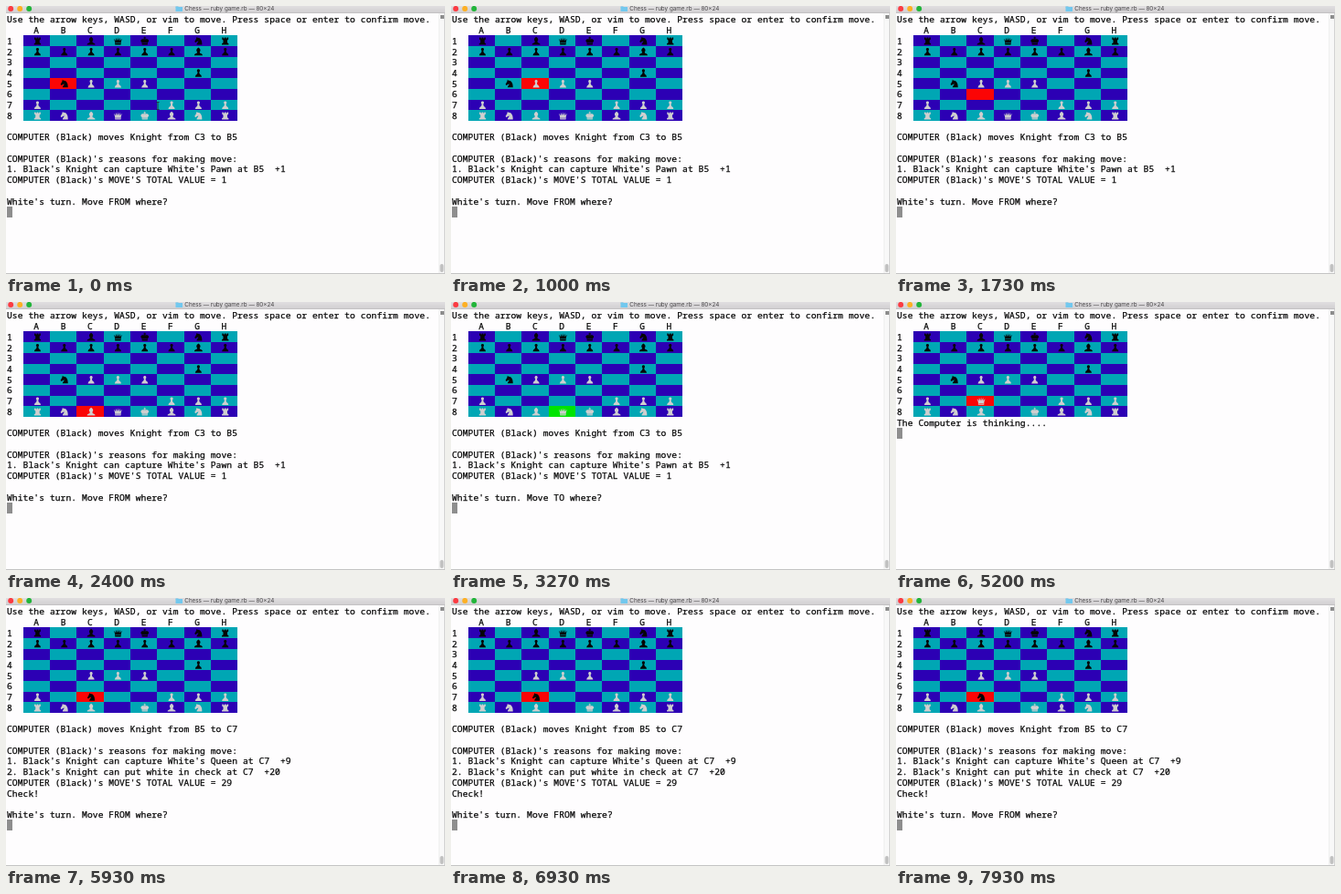
An HTML page with a canvas that plays this animation: 480 by 294 pixels, repeating every 8 s.

```html
<!DOCTYPE html>
<html lang="en">
<head>
<meta charset="utf-8">
<title>Chess in the terminal</title>
<style>
  html, body { margin: 0; width: 100%; height: 100%; overflow: hidden; background: #fefdfe; }
  canvas { display: block; width: 480px; height: 294px; }
</style>
</head>
<body>
<canvas id="stage"></canvas>
<script>
const W = 480, H = 294, LOOP = 8000;
const CELL = 5.865, LINE = 11.72, LEFT = 1, TOP = 9;
const BLUE = '#2c00b4', TEAL = '#00a6b4', RED = '#fb0505', GREEN = '#00e400';

const canvas = document.getElementById('stage');
const ctx = canvas.getContext('2d');
const dpr = window.devicePixelRatio || 1;
canvas.width = W * dpr;
canvas.height = H * dpr;

// Each piece is drawn in a 10 by 10 box; the band is cut out of the body.
const BAND = 'M2.3 7.4H7.7V7.9H2.3Z';
const SHAPES = {
  p: new Path2D('M5 .8A1.6 1.6 0 0 1 6 3.7L6 4.6C6 6 6.6 6.6 8 7.4L8.7 9.4H1.3L2 7.4C3.4 6.6 4 6 4 4.6L4 3.7A1.6 1.6 0 0 1 5 .8Z'),
  b: new Path2D('M5 .4C7.6 2 7.8 4 6.4 5.4L6.8 6.9C8 7.4 9.6 7.6 9.6 9.3H.4C.4 7.6 2 7.4 3.2 6.9L3.6 5.4C2.2 4 2.4 2 5 .4Z'),
  n: new Path2D('M3 .5L4 1.4C7.5 1.2 9.2 4.5 9.1 9.3H3C3 7.4 5 6.6 5 5L3 6 1.8 6.9 .7 5.8 2.5 2.6Z'),
  r: new Path2D('M1.5 1H3V2H4.2V1H5.8V2H7V1H8.5V3.4L7.3 4.2V7L8.8 8V9.4H1.2V8L2.7 7V4.2L1.5 3.4Z'),
  q: new Path2D('M.5 2.4L2.6 5 2.7 1.3 4.3 4.6 5 .8 5.7 4.6 7.3 1.3 7.4 5 9.5 2.4 8.3 6.8V9.3H1.7V6.8Z' + BAND),
  k: new Path2D('M4.6 .3H5.4V1.2H6.4V2H5.4V3.1C7 2.5 9.6 2.8 9.5 5 9.4 6.2 8.4 6.4 8.2 7V9.3H1.8V7C1.6 6.4 .6 6.2 .5 5 .4 2.8 3 2.5 4.6 3.1V2H3.6V1.2H4.6Z' + BAND)
};

// Lower case is Black, upper case is White; row 1 is at the top.
const START = [
  'r.bqk.nr', 'ppppppbp', '........', '......p.',
  '.nPPP...', '........', 'P....PPP', 'RNBQKBNR'
];
const place = (board, square, piece) => {
  const c = square.charCodeAt(0) - 65, r = square[1] - 1;
  return board.map((row, i) => i === r ? row.slice(0, c) + piece + row.slice(c + 1) : row);
};
const queenMoved = place(place(START, 'D8', '.'), 'C7', 'Q');
const queenTaken = place(place(queenMoved, 'B5', '.'), 'C7', 'n');

const report = (move, reasons, total, tail) => [
  '', `COMPUTER (Black) moves Knight from ${move}`, '',
  "COMPUTER (Black)'s reasons for making move:", ...reasons,
  `COMPUTER (Black)'s MOVE'S TOTAL VALUE = ${total}`, ...tail
];
const first = step => report('C3 to B5',
  ["1. Black's Knight can capture White's Pawn at B5  +1"], 1,
  ['', `White's turn. Move ${step} where?`]);
const second = report('B5 to C7',
  ["1. Black's Knight can capture White's Queen at C7  +9",
   "2. Black's Knight can put white in check at C7  +20"], 29,
  ['Check!', '', "White's turn. Move FROM where?"]);
const thinking = ['The Computer is thinking....'];

const scene = (at, square, color, board, lines) => ({ at, square, color, board, lines });
const from = (at, square) => scene(at, square, RED, START, first('FROM'));
const to = (at, square) => scene(at, square, GREEN, START, first('TO'));
const SCENES = [
  from(0, 'B5'), from(1000, 'C5'), from(1400, 'C6'), from(1870, 'C7'),
  from(2200, 'C8'), from(2530, 'D8'),
  to(3000, 'D8'), to(3530, 'C8'), to(3870, 'C7'),
  scene(4600, 'C7', RED, queenMoved, thinking),
  scene(5530, 'C7', RED, queenTaken, second)
];

function box(x, y, w, h, color) {
  ctx.fillStyle = color;
  ctx.fillRect(x, y, w, h);
}

// Fills a box whose edges are rounded to whole pixels.
function snapBox(x, y, w, h, color) {
  const l = Math.round(x), t = Math.round(y);
  box(l, t, Math.round(x + w) - l, Math.round(y + h) - t, color);
}

function drawText(text, col, row) {
  const x = LEFT + col * CELL, y = TOP + row * LINE + 9.4;
  ctx.font = '9.6px "Noto Sans Mono", "DejaVu Sans Mono", monospace';
  ctx.letterSpacing = '0.105px';
  ctx.fillStyle = ctx.strokeStyle = '#050505';
  ctx.lineWidth = 0.25;
  ctx.fillText(text, x, y);
  ctx.strokeText(text, x, y);
  ctx.letterSpacing = '0px';
}

function drawWindow() {
  box(0, 0, W, H, '#fefdfe');
  const bar = ctx.createLinearGradient(0, 0, 0, 8);
  bar.addColorStop(0, '#e0dee0');
  bar.addColorStop(1, '#d0ced0');
  box(0, 0, W, 8, bar);
  box(0, 7.5, W, 0.5, '#b5b3b5');
  ['#fb3b42', '#fdb024', '#22b53a'].forEach((color, i) => {
    ctx.fillStyle = color;
    ctx.beginPath();
    ctx.arc(5.2 + i * 10, 2.9, 3, 0, Math.PI * 2);
    ctx.fill();
  });
  box(185.5, 0.5, 3, 1, '#62bfe8');
  box(185.5, 1, 7.5, 5, '#72c8ee');
  ctx.font = '6.3px Inter, sans-serif';
  ctx.fillStyle = '#454345';
  ctx.fillText('Chess — ruby game.rb — 80×24', 195.3, 5.4);
  box(473, 8, 7, H - 8, '#f8f8f8');
  box(473, 8, 0.5, H - 8, '#e6e6e6');
  box(475, 10, 4, 4, '#8c8c8c');
  ctx.fillStyle = '#c1c1c1';
  ctx.beginPath();
  ctx.roundRect(474.5, 283, 4, 9, 2);
  ctx.fill();
  box(479, 8, 1, H - 8, '#d2d2d2');
  box(0, H - 1, W, 1, '#c4c4c4');
}

function drawPiece(piece, x, y) {
  const kind = piece.toLowerCase();
  ctx.save();
  ctx.translate(x, y);
  ctx.scale(0.97, 0.97);
  ctx.fillStyle = piece === kind ? '#050505' : '#cfcfcf';
  ctx.fill(SHAPES[kind], 'evenodd');
  ctx.restore();
}

function drawBoard({ board, square, color }) {
  const side = CELL * 5, x0 = LEFT + CELL * 3;
  board.forEach((pieces, r) => {
    const y = TOP + (r + 2) * LINE;
    drawText(String(r + 1), 0, r + 2);
    [...pieces].forEach((piece, c) => {
      const x = x0 + c * side;
      const name = 'ABCDEFGH'[c] + (r + 1);
      const fill = name === square ? color : (r + c) % 2 ? TEAL : BLUE;
      snapBox(x, y, side, LINE, fill);
      if (piece !== '.') drawPiece(piece, x + 11, y + 1);
    });
  });
}

function drawPointer() {
  box(165.6, 105.5, 0.8, 8, '#222');
  box(164.4, 105, 3.2, 0.7, '#222');
  box(164.4, 113.2, 3.2, 0.7, '#222');
}

function draw(t) {
  const now = SCENES.filter(s => s.at <= t).pop();
  ctx.setTransform(dpr, 0, 0, dpr, 0, 0);
  drawWindow();
  drawText('Use the arrow keys, WASD, or vim to move. Press space or enter to confirm move.', 0, 0);
  [...'ABCDEFGH'].forEach((letter, i) => drawText(letter, 5 + i * 5, 1));
  drawBoard(now);
  now.lines.forEach((line, i) => drawText(line, 0, 10 + i));
  snapBox(LEFT, TOP + (10 + now.lines.length) * LINE, CELL, LINE, '#8e8e8e');
  if (t < SCENES[1].at) drawPointer();
}

const begin = performance.now();
function tick() {
  draw((performance.now() - begin) % LOOP);
  requestAnimationFrame(tick);
}
tick();
</script>
</body>
</html>
```
